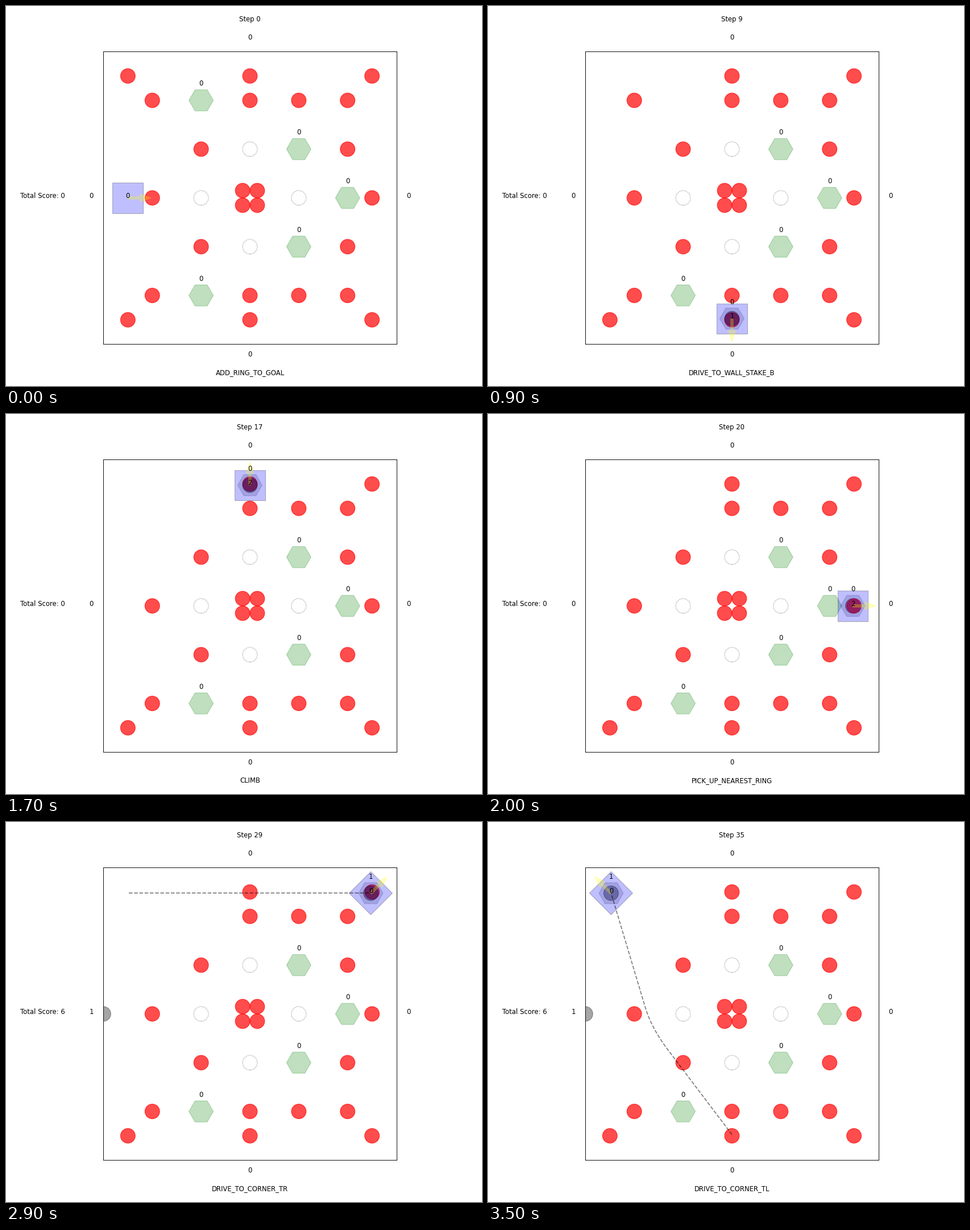
Write a matplotlib script that moves like this. It is 837 px wide and 669 px high and loops after 3.6 s.

```python
import math
import numpy as np
import matplotlib.pyplot as plt
from matplotlib.animation import FuncAnimation
from matplotlib.patches import Circle, FancyArrow, Polygon, RegularPolygon

DPI = 83.7
EDGE = 4.95

# Field coordinates are in feet, origin at the centre.
RINGS = (
    [(x, y) for x in (-5, 5) for y in (-5, 5)]
    + [(x, y) for x in (-4, 0, 2, 4) for y in (-4, 4)]
    + [(x, y) for x in (-2, 4) for y in (-2, 2)]
    + [(x, y) for x in (-0.3, 0.3) for y in (-0.3, 0.3)]
    + [(0, -5), (0, 5), (-4, 0)]
)
LAST_RING = (5, 0)
GOALS = [(-2, 4), (-2, -4), (2, 2), (2, -2), (4, 0)]
POSTS = [(-2, 0), (2, 0), (0, -2), (0, 2)]

SPOTS = {
    "CORNER_TL": (-EDGE, EDGE, 135),
    "CORNER_TR": (EDGE, EDGE, 45),
    "WALL_STAKE_L": (-EDGE, 0, 180),
    "WALL_STAKE_R": (EDGE, 0, 0),
    "WALL_STAKE_T": (0, EDGE, 90),
    "WALL_STAKE_B": (0, -EDGE, -90),
}

GET_GOAL, GET_RING = "PICK_UP_NEAREST_GOAL", "PICK_UP_NEAREST_RING"
ADD_GOAL, ADD_STAKE = "ADD_RING_TO_GOAL", "ADD_RING_TO_WALL_STAKE"
TO = "DRIVE_TO_"

ACTIONS = [
    ADD_GOAL, "CLIMB", GET_GOAL, TO + "CORNER_TL", GET_RING, "CLIMB",
    TO + "WALL_STAKE_B", GET_GOAL, "CLIMB", TO + "WALL_STAKE_B", GET_GOAL,
    TO + "CORNER_TL", "CLIMB", GET_RING, "CLIMB", GET_GOAL,
    TO + "WALL_STAKE_T", "CLIMB", TO + "WALL_STAKE_R", GET_GOAL, GET_RING,
    ADD_GOAL, TO + "WALL_STAKE_L", ADD_STAKE, "CLIMB", ADD_GOAL,
    "DROP_GOAL", GET_GOAL, TO + "CORNER_TL", TO + "CORNER_TR", "CLIMB",
    TO + "WALL_STAKE_R", "CLIMB", ADD_GOAL, TO + "WALL_STAKE_B",
    TO + "CORNER_TL",
]
GOAL_PICK = {2: (-2, 4)}
RING_PICK = {4: (-5, 5), 13: (-4, 4)}
# Rounded bends that keep the robot clear of the posts: entry, control, exit.
BENDS = {
    6: [(-3.56, 0.3), (-3.31, -0.56), (-2.64, -1.45)],
    11: [(-2.64, -1.45), (-3.31, -0.56), (-3.56, 0.3)],
    22: [(1.2, 3.2), (0, 3.8), (-1.2, 3.2)],
    35: [(-2.64, -1.45), (-3.31, -0.56), (-3.56, 0.3)],
}


def route(start, end, bend):
    if not bend:
        return np.array([start, end])
    a, c, b = map(np.array, bend)
    t = np.linspace(0, 1, 20)[:, None]
    curve = (1 - t) ** 2 * a + 2 * t * (1 - t) * c + t ** 2 * b
    return np.vstack([start, curve, end])


def simulate():
    pos, angle = (-5, 0), 0
    rings, goals = list(RINGS), list(GOALS)
    has_goal, held, on_goal, on_stake = False, 0, 0, 0
    states = []
    for step, action in enumerate(ACTIONS):
        target, turn = pos, angle
        if step in GOAL_PICK:
            target = GOAL_PICK[step]
            goals.remove(target)
            has_goal = True
        elif step in RING_PICK:
            target = RING_PICK[step]
            rings.remove(target)
            held += 1
        elif action.startswith(TO):
            *target, turn = SPOTS[action[len(TO):]]
            target = tuple(target)
        elif action == ADD_GOAL and has_goal and held:
            held, on_goal = held - 1, on_goal + 1
        elif action == ADD_STAKE:
            held, on_stake = held - 1, on_stake + 1

        path = None
        if target != pos:
            path = route(pos, target, BENDS.get(step))
            if not action.startswith(TO):
                dx, dy = path[-1] - path[-2]
                turn = math.degrees(math.atan2(dy, dx))
        pos, angle = target, turn
        states.append(dict(
            action=action, pos=pos, angle=angle, path=path,
            rings=list(rings), goals=list(goals), has_goal=has_goal,
            held=held, on_goal=on_goal, on_stake=on_stake))
    return states


STATES = simulate()
fig = plt.figure(figsize=(10, 669 / DPI), dpi=DPI)
ax = fig.add_subplot()


def label(x, y, text):
    ax.text(x, y, text, ha="center", fontsize=10, family="DejaVu Sans")


def disk(pos, color, alpha):
    ax.add_patch(Circle(pos, 0.3, color=color, alpha=alpha))


def goal(pos, color, alpha, count):
    ax.add_patch(RegularPolygon(pos, 6, radius=0.5, orientation=math.pi / 6,
                                color=color, alpha=alpha))
    label(pos[0], pos[1] + 0.6, count)


def robot(pos, angle):
    a = math.radians(angle)
    rot = np.array([[math.cos(a), math.sin(a)], [-math.sin(a), math.cos(a)]])
    square = 0.625 * np.array([(-1, -1), (1, -1), (1, 1), (-1, 1)])
    ax.add_patch(Polygon(square @ rot + pos, facecolor="blue",
                         edgecolor="black", alpha=0.25))
    ax.add_patch(FancyArrow(*pos, 0.5 * math.cos(a), 0.5 * math.sin(a),
                            width=0.1, head_width=0.3, head_length=0.45,
                            color="yellow", alpha=0.25))


def draw(step):
    s = STATES[step]
    ax.clear()
    ax.set(xlim=(-6, 6), ylim=(-6, 6), xticks=[], yticks=[], aspect="equal")

    for ring in s["rings"]:
        disk(ring, "red", 0.7)
    if s["held"] or s["on_goal"]:
        disk(s["pos"], "black", 0.35)
    disk(LAST_RING, "red", 0.7)
    if s["on_stake"]:
        disk((-6, 0), "black", 0.35)
    for post in POSTS:
        ax.add_patch(Circle(post, 0.3, fill=False, edgecolor="black",
                            linestyle=":", alpha=0.5))
    for g in s["goals"]:
        goal(g, "green", 0.25, 0)
    if s["has_goal"]:
        goal(s["pos"], "black", 0.15, s["on_goal"])

    robot(s["pos"], s["angle"])
    label(*s["pos"], s["held"])
    if s["path"] is not None:
        ax.plot(*s["path"].T, "k--", alpha=0.5, lw=1.5)

    label(-6.5, 0, s["on_stake"])
    for x, y in [(6.5, 0), (0, 6.5), (0, -6.5)]:
        label(x, y, 0)
    label(-8.5, 0, f"Total Score: {3 * (s['on_goal'] + s['on_stake'])}")
    label(0, 7.25, f"Step {step}")
    label(0, -7.25, s["action"])
    return []


anim = FuncAnimation(fig, draw, frames=len(STATES), interval=100,
                     init_func=lambda: draw(0), repeat=True, repeat_delay=0)
plt.show()
```
